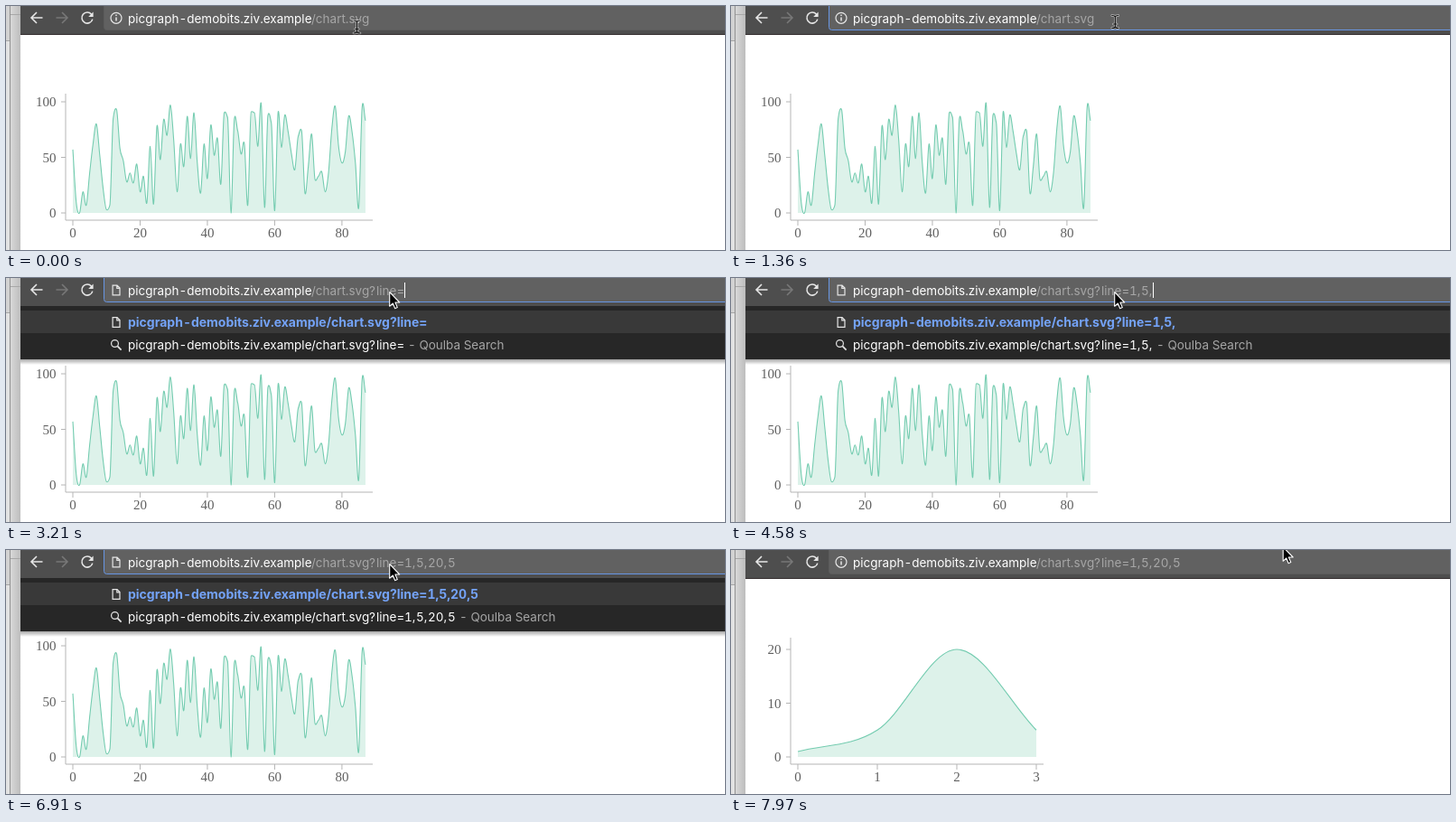
These frames come from a looping animation (796 by 270 pixels, 8 s). An HTML page:

```html
<!DOCTYPE html>
<html lang="en">
<head>
<meta charset="utf-8">
<title>Chart by address</title>
<style>
  html, body { margin: 0; width: 100%; height: 100%; overflow: hidden; background: #fff; }
  svg { display: block; width: 796px; height: 270px; }
  .ui { font: 13.5px Inter, Roboto, sans-serif; font-feature-settings: "tnum"; fill: #fff; white-space: pre; }
  .ui .dim { fill: #a6a6a6; }
  .ui .bold { font-size: 14px; font-weight: 700; fill: #74a3f8; }
  .axis { fill: none; stroke: #b5b5b5; }
  .label { font: 15px "Liberation Serif", "Times New Roman", serif; fill: #606060; }
  .area { fill: #ddf2ea; }
  .curve { fill: none; stroke: #74ccb0; stroke-width: 1.1; }
  .icon { fill: none; stroke: #e6e6e6; stroke-width: 1.2; }
  .nav { stroke-width: 1.6; }
</style>
</head>
<body>
<svg viewBox="0 0 796 270">
  <defs>
    <linearGradient id="edge">
      <stop offset="0" stop-color="#d8d8d8"/>
      <stop offset="1" stop-color="#bdbdbd"/>
    </linearGradient>
    <linearGradient id="shade" x2="0" y2="1">
      <stop offset="0" stop-color="#000" stop-opacity=".35"/>
      <stop offset="1" stop-color="#000" stop-opacity="0"/>
    </linearGradient>
    <path id="sheet" d="M-3.9 -5.4H1L4 -2.4V5.4H-3.9ZM.8 -5.2V-2.2H3.8"/>
    <path id="bar" d="M-3.5 -7Q-.5 -7 0 -5.5Q.5 -7 3.5 -7M0 -5.5V5.5M-3.5 7Q-.5 7 0 5.5Q.5 7 3.5 7M-1.8 2.5H1.8"/>
  </defs>

  <rect width="796" height="270" fill="#fff"/>
  <g id="many"></g>
  <g id="few"></g>

  <!-- window behind -->
  <rect width="4" height="270" fill="#e2e2e2"/>
  <rect width="4" height="38" fill="#d2d2d2"/>
  <rect y="38" width="4" height="1" fill="#a5a5a5"/>
  <rect x="5" width="11" height="270" fill="url(#edge)"/>
  <rect x="5" y="9" width="11" height="1" fill="#a8a8a8"/>
  <rect x="4" width="1" height="270" fill="#929292"/>

  <!-- toolbar -->
  <rect x="16" width="780" height="31" fill="#4e4e4e"/>
  <rect x="16" y="31" width="780" height="1" fill="#332d2e"/>
  <rect id="field" x="108.5" y="-6" width="700" height="32.5" rx="3" fill="#616161"/>
  <g class="icon nav">
    <path d="M40.5 13H28.5M34 7L28 13L34 19"/>
    <path d="M55.5 13H67.5M62 7L68 13L62 19" stroke="#777"/>
    <path d="M94.6 9.2A6 6 0 1 0 95.8 14.6"/>
    <path d="M96.6 6.6V12H91.2Z" fill="#e6e6e6" stroke="none"/>
  </g>
  <g id="info" class="icon">
    <circle cx="122" cy="13.3" r="6"/>
    <path d="M122 12.4V16.6M122 9.6V11" stroke-width="1.5"/>
  </g>
  <use id="page" href="#sheet" x="122" y="13.5" class="icon"/>
  <rect id="mark" x="135" y="4" width="268" height="19" fill="#5f86bd"/>

  <!-- suggestions -->
  <g id="drop">
    <rect x="16" y="90" width="780" height="6" fill="url(#shade)"/>
    <rect x="16" y="31" width="780" height="59" fill="#272727"/>
    <rect x="16" y="36" width="780" height="25" fill="#393939"/>
    <use href="#sheet" x="122" y="49" class="icon"/>
    <g class="icon"><circle cx="120.5" cy="72.5" r="3.9"/><path d="M123.4 75.4L127.6 79.6" stroke-width="1.7"/></g>
  </g>
  <g id="words" class="ui"></g>
  <rect id="caret" y="5" width="1" height="17" fill="#fff"/>

  <!-- pointers -->
  <g id="beam" fill="none" stroke-linecap="round">
    <use href="#bar" stroke="#fff" stroke-opacity=".6" stroke-width="2.6"/>
    <use href="#bar" stroke="#111" stroke-width="1.2"/>
  </g>
  <path id="arrow" d="M0 0V15.6L3.6 12.3L6 18L8.6 16.9L6.2 11.3H11Z" fill="#000" stroke="#fff" stroke-width="1.1" stroke-linejoin="round"/>
</svg>

<script>
const LOOP = 8000, FOCUS = 400, CLICK = 820, ENTER = 7150, LEAVE = 7680, BLINK = 530;
const HOST = "picgraph-demobits.ziv.example", FILE = "/chart.svg", QUERY = "?line=1,5,20,5";
const keys = [1780, 2550, 2610, 2790, 2970, 3210, 3560, 3860, 4490, 4580, 5050, 5290, 5710, 6370];
const stops = [402, 410, 413, 416, 424, 432, 441, 450, 454, 463, 467, 476, 485, 489, 498];

const el = id => document.getElementById(id);
const show = (id, on) => el(id).setAttribute("visibility", on ? "visible" : "hidden");
const move = (id, x, y) => el(id).setAttribute("transform", `translate(${x} ${y})`);

// Cubic through evenly spaced points; tangents are mean slopes, shortened where too steep
function curve(pts) {
  const n = pts.length - 1, h = pts[1][0] - pts[0][0];
  const s = Array.from({ length: n }, (_, i) => (pts[i + 1][1] - pts[i][1]) / h);
  const m = pts.map((_, i) => ((s[i - 1] ?? s[i]) + (s[i] ?? s[i - 1])) / 2);
  s.forEach((d, i) => {
    const size = Math.hypot(m[i], m[i + 1]), most = 3 * Math.abs(d);
    if (size > most) {
      m[i] *= most / size;
      m[i + 1] *= most / size;
    }
  });
  let d = "M" + pts[0];
  for (let i = 0; i < n; i++) {
    const [x, y] = pts[i], [u, v] = pts[i + 1];
    d += `C${x + h / 3},${y + m[i] * h / 3} ${u - h / 3},${v - m[i + 1] * h / 3} ${u},${v}`;
  }
  return d;
}

function chart(id, data, right, unit, xStep, yStep) {
  const dx = (right - 74) / (data.length - 1);
  const px = i => 74 + i * dx, py = v => 229 - v * unit;
  const line = curve(data.map((v, i) => [px(i), py(v)]));
  let axis = `M66 97V237H${right + 8}`, labels = "";
  for (let i = 0; i < data.length; i += xStep) {
    axis += `M${px(i)} 237v6`;
    labels += `<text class="label" text-anchor="middle" x="${px(i)}" y="256">${i}</text>`;
  }
  for (let k = 0; k < 3; k++) {
    const y = py(k * yStep);
    axis += `M66 ${y}h-5`;
    labels += `<text class="label" text-anchor="end" x="55.5" y="${y + 5}">${k * yStep}</text>`;
  }
  el(id).innerHTML = `<path class="area" d="${line}V229H74Z"/><path class="curve" d="${line}"/>
    <path class="axis" d="${axis}"/>${labels}`;
}

chart("many", [
  57, 10, 0, 19, 7, 36, 62, 80, 52, 22, 3, 7, 85, 93, 58, 47, 28, 36, 27, 44, 19, 33,
  9, 60, 8, 78, 48, 84, 70, 97, 65, 19, 62, 42, 87, 49, 90, 45, 18, 62, 31, 79, 52, 67,
  26, 90, 86, 0, 84, 74, 53, 62, 7, 91, 90, 60, 98, 5, 88, 81, 2, 90, 59, 88, 73, 53,
  39, 69, 74, 18, 42, 71, 30, 33, 37, 19, 36, 76, 96, 60, 45, 55, 87, 73, 45, 5, 95, 83
], 398, 1.23, 20, 50);
chart("few", [1, 5, 20, 5], 338, 5.95, 1, 10);

// The typed query is set in short runs that start where the caret stood
const cuts = [0, 1, 6, 8, 10, 13, 14];
const run = (x, y, text, cls = "") => `<text x="${x}" y="${y}" class="${cls}">${text}</text>`;

function address(typed, y, cls) {
  const parts = cuts.slice(1).map((end, i) => run(stops[cuts[i]], y, typed.slice(cuts[i], end), cls));
  return run(135, y, HOST) + run(338, y, FILE, cls) + parts.join("");
}

let shown = "";
function write(n, open) {
  const state = n + "/" + open;
  if (state === shown) return;
  shown = state;
  const typed = QUERY.slice(0, n);
  let out = address(typed, 18.5, "dim");
  if (open) {
    out += run(135, 53.5, HOST + FILE + typed, "bold") + address(typed, 79, "") +
      run(stops[n] + 4, 79, "- Qoulba Search", "dim");
  }
  el("words").innerHTML = out;
}

function pointer(t) {
  let x = 425.3, y = 17.5, arrow = (t >= FOCUS && t < CLICK) || (t >= keys[0] && t < ENTER);
  if (t < 220) {
    const k = t < 60 ? 0 : 1 + Math.floor((t - 60) / 53.4);
    x = [388.5, 397, 409, 420][k];
    y = [23, 22, 20, 18][k];
  } else if (t >= LEAVE) {
    const k = Math.min(6, 1 + Math.floor((t - LEAVE) / 58)) / 6;
    const e = k * k * (3 - 2 * k);
    x += 186.5 * e;
    y -= 19 * e;
    arrow = y < 1;
  }
  show("arrow", arrow);
  show("beam", !arrow);
  move("arrow", x - .6, y - 1.8);
  move("beam", x, y);
}

function draw(t) {
  const n = keys.filter(k => t >= k).length;
  const loaded = t >= ENTER, focus = t >= FOCUS && !loaded, open = n > 0 && !loaded;
  const last = n ? keys[n - 1] : CLICK;
  show("many", !loaded);
  show("few", loaded);
  show("drop", open);
  show("page", open);
  show("info", !open);
  show("mark", focus && t < CLICK);
  show("caret", focus && t >= CLICK && t - last < BLINK);
  el("caret").setAttribute("x", stops[n]);
  el("field").setAttribute("stroke", focus ? "#6795e3" : "#5c5c5c");
  write(n, open);
  pointer(t);
}

const start = performance.now();
function tick() {
  draw((performance.now() - start) % LOOP);
  requestAnimationFrame(tick);
}
tick();
</script>
</body>
</html>
```
